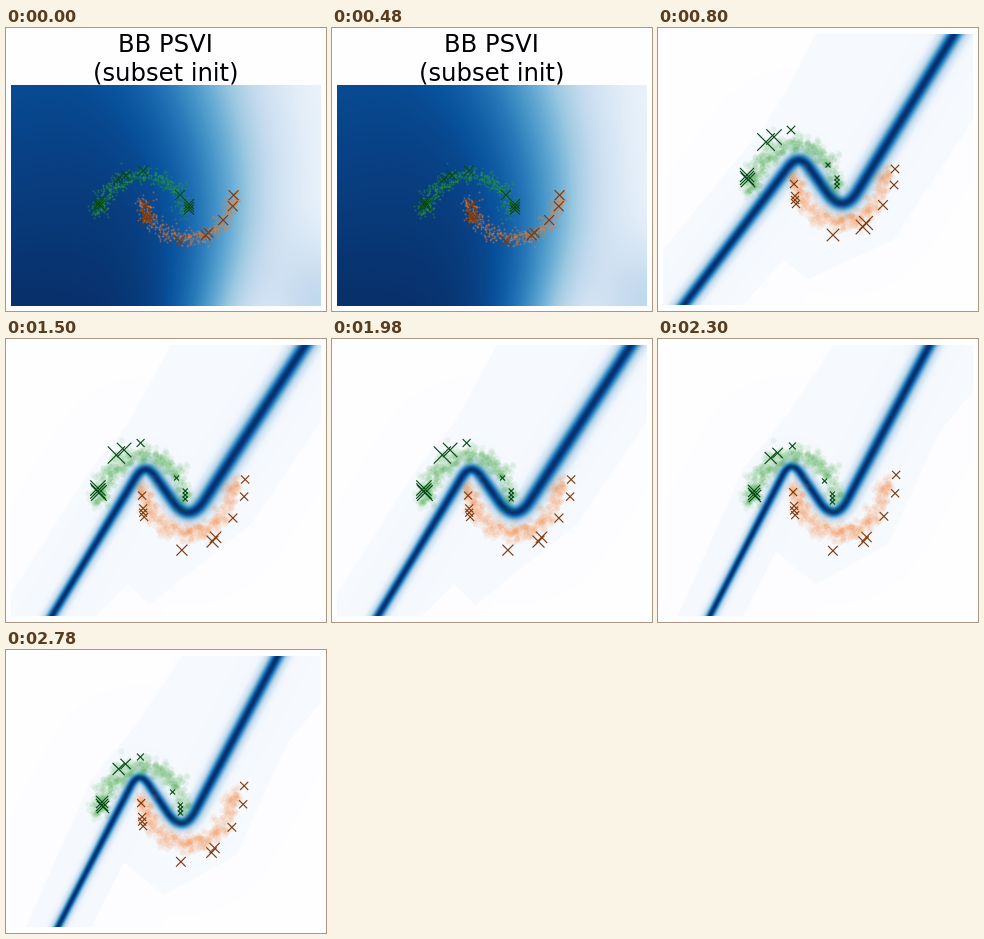
A matplotlib script for the animation above (3100 ms loop, 320x283 px).

```python
import numpy as np
import matplotlib.pyplot as plt
from matplotlib.animation import FuncAnimation
from matplotlib.collections import LineCollection

W, H, DPI = 320, 283, 64
STEP_MS = 100
HOLDS = [8, 7, 8, 8]  # steps each scene stays
LEFT, RIGHT, TOP, BOTTOM = 5, 315, 6, 277
TITLE_TOP, TITLE_BOTTOM = 57, 278
BLUES = plt.get_cmap("Blues")

# Pseudo-points of each class, relative to its centre.
GREEN_AT, BROWN_AT = np.array([136, 150]), np.array([180, 155])
GREEN = np.array([(-47, -3), (-46, 2), (-47, 0), (-28, -36), (-20, -41),
                  (-3, -48), (34, -13), (43, 0), (43, 4), (43, 8)])
BROWN = np.array([(-44, 1), (-43, 13), (-43, 17), (-42, 21), (-5, 52),
                  (25, 44), (28, 40), (45, 22), (56, 2), (57, -14)])

fig = plt.figure(figsize=(W / DPI, H / DPI), dpi=DPI, facecolor="#fefdff")
ax = fig.add_axes([0, 0, 1, 1])


def px(size):
    """Pixels to points."""
    return size * 72 / DPI


def below_title(y):
    return TITLE_TOP + (y - TOP) * (TITLE_BOTTOM - TITLE_TOP) / (BOTTOM - TOP)


def unchanged(y):
    return y


def draw_moons(size, alpha, fit=unchanged, n=430, noise=4.8):
    rng = np.random.default_rng(4)
    dots = []
    for cx, cy, rx, ry, color in ((136, 166, 43, -50, "#2ca02c"),
                                  (182, 143, 45, 50, "#f47d2c")):
        t = np.pi * rng.random(n)
        dx, dy = rng.normal(0, noise, (2, n))
        dots.append(ax.scatter(cx + rx * np.cos(t) + dx, fit(cy + ry * np.sin(t) + dy),
                               s=px(size) ** 2, c=color, alpha=alpha,
                               linewidths=0, zorder=3))
    return dots


def draw_crosses(at, offsets, scale, shift, base, swell, peak, color, fit=unchanged):
    """Crosses that are largest around x = peak."""
    segments = []
    for x, y in at + offsets * scale + shift:
        r = (base + swell * np.exp(-((x - peak) / 25) ** 2)) / 2
        y = fit(y)
        segments += [[(x - r, y - r), (x + r, y + r)], [(x - r, y + r), (x + r, y - r)]]
    return ax.add_collection(
        LineCollection(segments, colors=color, linewidths=px(1.15), zorder=4))


def green_crosses(scale, shift, base=5, swell=13, **kw):
    return draw_crosses(GREEN_AT, GREEN, scale, shift, base, swell, 104, "#064a14", **kw)


def brown_crosses(scale, shift, base=8, swell=8, **kw):
    return draw_crosses(BROWN_AT, BROWN, scale, shift, base, swell, 194, "#7f3a0c", **kw)


def draw_gradient():
    u, v = np.meshgrid(np.linspace(0, 1, RIGHT - LEFT),
                       np.linspace(0, 1, TITLE_BOTTOM - TITLE_TOP))
    edge = 0.66 + 0.06 * np.sin(np.pi * v)
    field = 1 / (1 + np.exp((u - edge) / (0.13 - 0.05 * v)))
    field -= 0.10 * (1 - u) * (1 - v)
    field += 0.25 * np.exp(-((u - 1) / 0.16) ** 2 - ((v - 1) / 0.3) ** 2)
    return ax.imshow(field, cmap=BLUES, vmin=0, vmax=1, aspect="auto", zorder=1,
                     extent=(LEFT, RIGHT, TITLE_BOTTOM, TITLE_TOP))


def bend(before, corner, after, radius):
    """Quadratic curve that rounds one corner."""
    def toward(p):
        return corner + radius * (p - corner) / np.hypot(*(p - corner))
    t = np.linspace(0, 1, 14)[:, None]
    return (1 - t) ** 2 * toward(before) + 2 * t * (1 - t) * corner + t ** 2 * toward(after)


def band_path(points):
    start, peak, valley, end = np.array(points, float)
    return np.vstack([start, bend(start, peak, valley, 18),
                      bend(peak, valley, end, 28), end])


def distance(gx, gy, path):
    dist = np.full(gx.shape, np.inf)
    for (x0, y0), (x1, y1) in zip(path[:-1], path[1:]):
        dx, dy = x1 - x0, y1 - y0
        t = np.clip(((gx - x0) * dx + (gy - y0) * dy) / (dx * dx + dy * dy), 0, 1)
        dist = np.minimum(dist, np.hypot(gx - x0 - t * dx, gy - y0 - t * dy))
    return dist


def draw_band(points, spread):
    """Boundary uncertainty: entropy of a sigmoid of the distance to the path."""
    gx, gy = np.meshgrid(np.arange(LEFT, RIGHT) + 0.5, np.arange(TOP, BOTTOM) + 0.5)
    dist = distance(gx, gy, band_path(points))
    p = 1 / (1 + np.exp(-dist / np.interp(gx, [80, 220], spread)))
    q = np.clip(1 - p, 1e-9, 1)
    value = -0.96 * (p * np.log2(p) + q * np.log2(q)) + 0.04 * np.exp(-dist / 20)
    rgba = BLUES(value)
    rgba[..., 3] = np.clip(value * 10, 0, 1)
    return ax.imshow(rgba, aspect="auto", zorder=2, extent=(LEFT, RIGHT, BOTTOM, TOP))


def draw_halo(points):
    return ax.fill(*zip(*points), color="#f6f9fe", linewidth=0, zorder=1)[0]


def title_scene():
    text = [ax.text(159.5, y, s, fontsize=px(24.3), family="DejaVu Sans",
                    ha="center", va="baseline", color="black")
            for y, s in ((24.5, "BB PSVI"), (52.5, "(subset init)"))]
    plain = dict(base=10, swell=0, fit=below_title)
    return text + [draw_gradient(), *draw_moons(2, 0.45, below_title),
                   green_crosses((1, 0.85), (4, 2), **plain),
                   brown_crosses((0.87, 0.85), (-2, -2), **plain)]


def band_scene(path, spread, halo, green, brown):
    return [draw_halo(halo), draw_band(path, spread), *draw_moons(6, 0.075),
            green_crosses(**green), brown_crosses(**brown)]


scenes = [
    title_scene(),
    band_scene(
        path=[(8.6, 300), (141, 125), (185, 187), (312.4, -20)],
        spread=(2.8, 3.3),
        halo=[(LEFT, 222), (105, 100), (128, 64), (158, TOP), (RIGHT, TOP),
              (RIGHT, 92), (235, 212), (150, 251), (125, 232), (85, BOTTOM),
              (LEFT, BOTTOM)],
        green=dict(scale=1, shift=0),
        brown=dict(scale=1, shift=0)),
    band_scene(
        path=[(32, 300), (139, 123), (183, 185), (316, -20)],
        spread=(2.2, 3.4),
        halo=[(LEFT, 255), (85, 130), (122, 85), (165, TOP), (RIGHT, TOP),
              (RIGHT, 82), (245, 185), (143, 266), (122, 245), (90, BOTTOM),
              (LEFT, BOTTOM)],
        green=dict(scale=(0.97, 1), shift=(1.5, 2)),
        brown=dict(scale=(1.02, 1.07), shift=(1, 0.5), swell=5)),
    band_scene(
        path=[(40, 300), (133, 120), (176.5, 185), (285.5, -20)],
        spread=(1.8, 2.8),
        halo=[(20, BOTTOM), (85, 130), (130, 75), (176, TOP), (RIGHT, TOP),
              (RIGHT, 52), (282, 92), (230, 205), (158, 245), (118, 212),
              (85, BOTTOM)],
        green=dict(scale=(0.87, 1), shift=(1, 5), swell=8),
        brown=dict(scale=(1.02, 1.15), shift=(0, -3), swell=3)),
]

ax.set(xlim=(0, W), ylim=(H, 0))
ax.axis("off")
order = np.repeat(np.arange(len(scenes)), HOLDS)


def update(step):
    for i, scene in enumerate(scenes):
        for artist in scene:
            artist.set_visible(i == order[step])
    return []


anim = FuncAnimation(fig, update, frames=len(order), interval=STEP_MS,
                     repeat=True, repeat_delay=0, blit=False)
plt.show()
```
